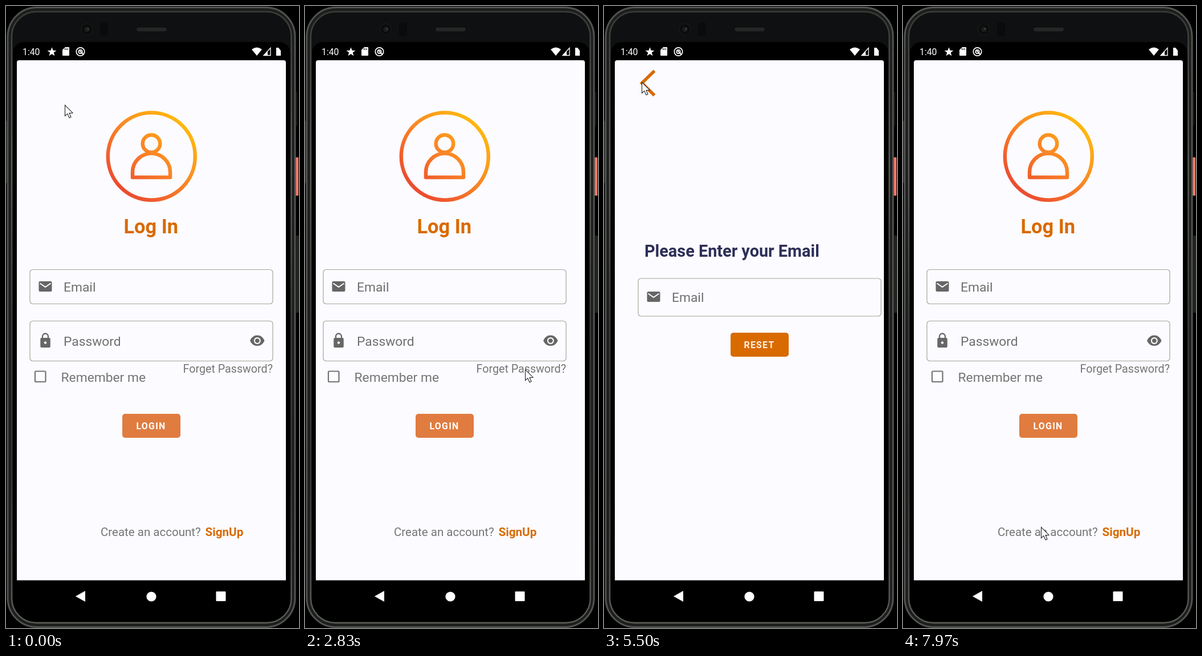
These frames come from a looping animation (514 px wide and 1089 px high, 8000 ms). An HTML page with a canvas:

```html
<!DOCTYPE html>
<html lang="en">
<head>
<meta charset="utf-8">
<title>Login flow</title>
<style>
html, body { margin: 0; width: 100%; height: 100%; overflow: hidden; background: #000; }
canvas { display: block; }
</style>
</head>
<body>
<canvas id="stage" width="514" height="1089"></canvas>
<script>
const ctx = document.getElementById('stage').getContext('2d');
const LOOP = 8000;
const SLIDE = 440;
const PAGE = 473;
const ORANGE = '#d96a00', GREY = '#757575', ICON = '#666666', PAPER = '#fcfbff';

// Pointer keys: time, x, y
const PATH = [
  [0, 103, 173], [30, 103, 173], [500, 240, 400], [770, 240, 400],
  [1200, 373, 630], [1400, 373, 630], [1700, 386, 647], [2000, 386, 647],
  [2100, 386, 636], [3470, 386, 636], [3970, 245, 347], [4200, 200, 270],
  [4500, 200, 270], [5100, 66, 133], [6270, 66, 133], [6630, 125, 400],
  [6870, 125, 400], [7670, 217, 780], [7830, 234, 906], [7940, 234, 906],
  [7970, 242, 912], [8000, 242, 912]
];

function pointerAt(t) {
  const i = Math.max(1, PATH.findIndex(k => k[0] >= t));
  const [t0, x0, y0] = PATH[i - 1], [t1, x1, y1] = PATH[i];
  const p = (t - t0) / (t1 - t0);
  return [x0 + (x1 - x0) * p, y0 + (y1 - y0) * p];
}

function ease(t, start) {
  const p = Math.min(1, Math.max(0, (t - start) / SLIDE));
  return (1 - Math.cos(Math.PI * p)) / 2;
}

function box(x, y, w, h, r, fill, stroke, width = 1) {
  ctx.beginPath();
  ctx.roundRect(x, y, w, h, r);
  paint(fill, stroke, width);
}

function disc(x, y, r, fill, stroke, width) {
  ctx.beginPath();
  ctx.arc(x, y, r, 0, 7);
  paint(fill, stroke, width);
}

function shape(d, fill, stroke, width, x = 0, y = 0) {
  const p = new Path2D();
  p.addPath(new Path2D(d), new DOMMatrix([1, 0, 0, 1, x, y]));
  paint(fill, stroke, width, p);
}

function paint(fill, stroke, width, path) {
  if (fill) {
    ctx.fillStyle = fill;
    path ? ctx.fill(path, 'evenodd') : ctx.fill();
  }
  if (stroke) {
    ctx.strokeStyle = stroke;
    ctx.lineWidth = width;
    path ? ctx.stroke(path) : ctx.stroke();
  }
}

function text(str, x, y, size, color, weight = 400, spacing = 0) {
  ctx.font = `${weight} ${size}px Roboto, sans-serif`;
  ctx.letterSpacing = spacing + 'px';
  ctx.fillStyle = color;
  ctx.fillText(str, x, y);
}

function vertical(y0, y1, ...colors) {
  const g = ctx.createLinearGradient(0, y0, 0, y1);
  colors.forEach((c, i) => g.addColorStop(i / (colors.length - 1), c));
  return g;
}

function drawPhone() {
  ctx.fillStyle = '#000';
  ctx.fillRect(0, 0, 514, 1089);
  // Side keys
  box(508, 265, 5, 67, 1, '#f47a6b');
  box(509, 402, 5, 135, 1, '#202220');
  box(509, 150, 2, 60, 1, '#151615');
  box(0, 201, 3, 109, 1, '#292b29');
  // Metal rim
  box(3, 2.5, 504, 1085, 51, '#1c1e1c', '#50534f', 3);
  box(10, 10, 490.5, 1070, 43, '#0f1011',
    vertical(10, 1080, '#3a3c39', '#5a5d57', '#3a3c39', '#343633', '#5a5d57'), 2.5);
  // Glass
  box(12, 63, 487, 1015, [20, 20, 40, 40], '#000');
  disc(142, 41, 10, '#0b0c0c', '#1c1d1d', 1);
  disc(142, 41, 4.5, '#1c1d1d');
  disc(144, 40, 1.5, '#454645');
  box(165, 29, 14, 24, 3, '#0a0b0b');
  box(228.5, 37, 54, 8, 4, '#252625', '#0b0b0b', 1);
}

function drawStatusBar() {
  text('1:40', 29, 86, 15.8, '#fff');
  ctx.beginPath();
  for (let i = 0; i < 10; i++) {
    const r = i % 2 ? 3.5 : 8.3, a = i * Math.PI / 5 - Math.PI / 2;
    ctx.lineTo(80.5 + r * Math.cos(a), 80.5 + r * Math.sin(a));
  }
  paint('#fff');
  shape('M104 72H110Q111 72 111 73V86Q111 87 110 87H100Q99 87 99 86V77Z', '#fff');
  ctx.fillStyle = '#000';
  for (let i = 0; i < 3; i++) ctx.fillRect(103 + i * 2.4, 74, 1, 3);
  disc(130.5, 80, 7.2, null, '#fff', 1.7);
  disc(130.5, 80, 3.2, null, '#fff', 1.7);
  shape('M129 78L136 85', null, '#fff', 1.8);
  shape('M431 76Q440 69 449 76L440 87Z', '#fff');
  shape('M464 73.5V86.5H452Z', null, '#fff', 1.3);
  shape('M459 79V86.5H452Z', '#fff');
  shape('M474 73H478L482 78V87H474Z', '#fff');
}

function drawNav() {
  shape('M122 1033.5L139 1024V1043Z', '#fff');
  disc(255, 1034, 8.6, '#fff');
  box(368.5, 1025, 17, 17, 1, '#fff');
}

function drawMail(y) {
  box(57.5, y - 9, 23, 18, 2, ICON);
  shape('M59.5 -5.5L69 1L78.5 -5.5', null, PAPER, 2, 0, y);
}

function drawField(y, h, label) {
  box(42, y + .5, 426, h, 5, null, '#a5a59c', 1.2);
  text(label, 101, y + h / 2 + 8.5, 22.8, '#707070');
}

function drawButton(y, label, x, fill, ink) {
  box(204, y, 102, 42, 5, fill);
  text(label, x, y + 27, 15.8, ink, 700, 1.3);
}

function drawAvatar() {
  const g = ctx.createLinearGradient(205, 325, 312, 205);
  g.addColorStop(0, '#ec4a30');
  g.addColorStop(.5, '#f98427');
  g.addColorStop(1, '#ffb90e');
  ctx.lineJoin = 'round';
  disc(255.3, 263.3, 76.5, null, g, 6.5);
  disc(255, 241, 15.3, null, g, 6.5);
  shape('M222 300V291A33 33 0 0 1 288 291V300Z', null, g, 6.5);
  ctx.lineJoin = 'miter';
}

function drawLogin() {
  drawAvatar();
  text('Log In', 206.5, 398, 34.4, ORANGE, 700);
  drawField(461, 60, 'Email');
  drawMail(491);
  drawField(551, 70, 'Password');
  // Lock
  shape('M64 582V578.5A5 5 0 0 1 74 578.5V582', null, ICON, 2.3);
  box(60.3, 581, 17.5, 17, 2, ICON);
  disc(69, 589.5, 2.2, PAPER);
  // Eye
  shape('M428 586Q432 576.5 440.8 576.5T453.5 586Q449.5 595 440.8 595T428 586Z', ICON);
  disc(440.8, 586, 6, PAPER);
  disc(440.8, 586, 3.8, ICON);
  box(51, 639.5, 18.5, 18.5, 1.5, null, GREY, 2.2);
  text('Remember me', 96.5, 658, 22.8, GREY);
  text('Forget Password?', 310.5, 642, 19.7, GREY);
  drawButton(714, 'LOGIN', 228.5, '#e07c40', '#fff');
  text('Create an account?', 166, 927.5, 20.5, GREY);
  text('SignUp', 349.5, 927.5, 20.7, ORANGE, 700);
}

function drawReset() {
  shape('M70.5 113.5L48.5 135L70.5 156.5', null, ORANGE, 5.5);
  text('Please Enter your Email', 53, 438.5, 28.85, '#2d2e57', 700);
  drawField(476.5, 66, 'Email');
  drawMail(509);
  drawButton(572, 'RESET', 227.5, ORANGE, '#fff3e8');
}

function drawPage(draw, dx) {
  if (Math.abs(dx) >= PAGE) return;
  ctx.save();
  ctx.translate(dx, 0);
  draw();
  ctx.restore();
}

function render(t) {
  const shift = Math.round(PAGE * (ease(t, 2789) - ease(t, 5445)));
  drawPhone();
  drawStatusBar();
  drawNav();
  ctx.save();
  box(19, 95, 472, 910.5, [4, 4, 0, 0], PAPER);
  ctx.clip();
  drawPage(drawLogin, -shift);
  drawPage(drawReset, PAGE - shift);
  ctx.restore();
  const [x, y] = pointerAt(t);
  shape('M.5 .5V19.5L4.8 15.6L8 22.8L11 21.5L8 14.6L14 14.2Z', '#fff', '#222', 1.1, x, y);
}

function tick(now) {
  render(Math.round(now / 10) * 10 % LOOP);
  requestAnimationFrame(tick);
}
requestAnimationFrame(tick);
</script>
</body>
</html>
```
